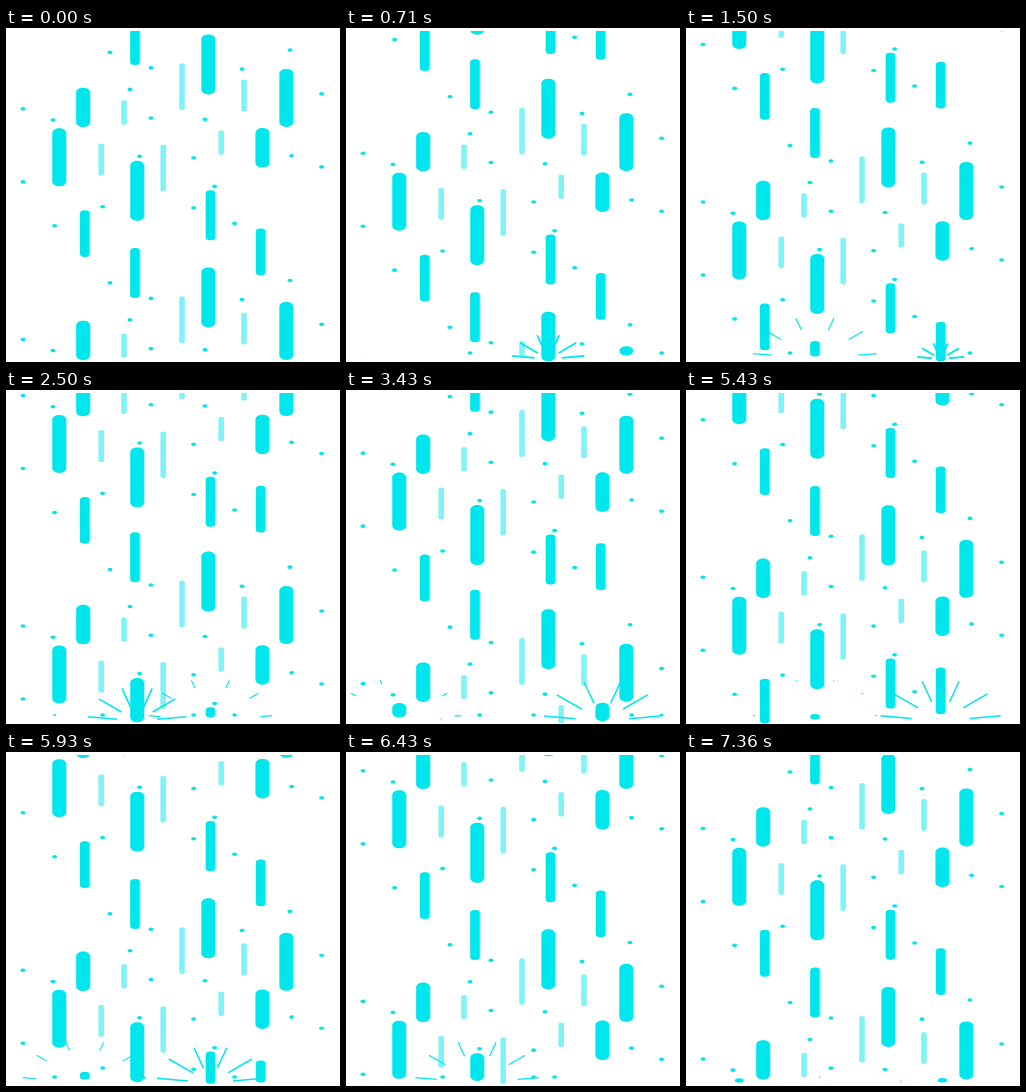
Animation, 334 px wide and 334 px high, one loop 7.43 s. Source, as an HTML page with a canvas:

```html
<!DOCTYPE html>
<html lang="en">
<head>
<meta charset="utf-8">
<title>Rain</title>
<style>
  html, body { margin: 0; width: 100%; height: 100%; overflow: hidden; background: #fff; }
  canvas { display: block; width: 334px; height: 334px; }
</style>
</head>
<body>
<canvas id="stage"></canvas>
<script>
const SIZE = 334, LOOP = 7430, STEPS = 104, FALL = 461, HALF = FALL / 2, GROUND = 331;
const CYAN = '#00e6ed', PALE = '#7ff3f6', EDGE = '#b4eaee';
const BAR_GAP = 228, SPLASH_START = 4, SPLASH_END = 46;

// The scene is half drawn: a half turn about the middle gives the other half.
const withTurned = (points, sumX, sumY) => points.flatMap(([x, y, h, gap = BAR_GAP]) => [
  { x, y, h, gap },
  { x: sumX - x, y: sumY - y, h, gap: HALF }
]);

// Bars: centre x, centre y, height, optional gap to the next copy
const wide = withTurned([[77, 79, 39.5], [202.2, 36, 60], [280.2, 69.5, 58]], 333.3, 198.4);
const narrow = withTurned([[128.9, 11.6, 50], [254.6, 223.6, 46.8, 260]], 333.3, 198.4);
const thin = withTurned([[176, 58.3, 46.7], [118, 84, 24.5], [238, 67, 32]], 333.2, 198);
const dots = withTurned([
  [17, 80.5], [17, 153.5], [47, 91.7], [104, 24], [124, 61],
  [145, 39.5], [145, 89.7], [199, 91], [236, 40.7], [284, 21.6]
], 332.6, 219);
const rayTips = [[5, 62], [30, 55.5], [65, 45]];   // degrees, length

const canvas = document.getElementById('stage');
const ctx = canvas.getContext('2d');
const ratio = window.devicePixelRatio || 1;
canvas.width = canvas.height = SIZE * ratio;
ctx.scale(ratio, ratio);

const clamp = (v, lo = 0, hi = 1) => Math.min(hi, Math.max(lo, v));
const copies = (y, gap) => [y - FALL, y - gap, y, y - gap + FALL];

function capsule(cx, top, w, h, color) {
  ctx.fillStyle = color;
  ctx.beginPath();
  ctx.roundRect(cx - w / 2, top, w, h, { x: w / 2, y: Math.min(h / 2, w * 0.34) });
  ctx.fill();
}

// A bar sinks into the ground, flattens and shrinks away.
function drawBar(x, top, w, h, color) {
  if (top > 330 || top + h < 0) return;
  const end = top + h, past = end - GROUND;
  const sunk = Math.min(end, clamp(334 - (past - 10) / 4, 327.5, 333.5));
  const bottom = Math.max(sunk, Math.min(top + 5.5, 330.5, end));
  const width = w * clamp((330 - top) / 6);
  if (color === CYAN) capsule(x + 1.2, top, width, bottom - top, EDGE);
  capsule(x, top, width, bottom - top, color);
}

function drawSplash(x, past) {
  if (past < SPLASH_START || past > SPLASH_END) return;
  const age = past - SPLASH_START;
  const outer = Math.sin(clamp(age / 22) * Math.PI / 2);
  const inner = Math.min(age / 40, outer);
  ctx.strokeStyle = CYAN;
  ctx.lineWidth = clamp(2.1 - past / 35, 1.1, 1.9);
  ctx.beginPath();
  for (const [angle, length] of rayTips) {
    const rad = angle * Math.PI / 180;
    const dx = Math.cos(rad) * length, dy = Math.sin(rad) * length;
    for (const side of [-1, 1]) {
      ctx.moveTo(x + side * dx * inner, GROUND - dy * inner);
      ctx.lineTo(x + side * dx * outer, GROUND - dy * outer);
    }
  }
  ctx.stroke();
}

// A dot rests on the ground for a moment before it fades.
function drawDot(x, y) {
  const rest = 325, scale = clamp((32 - (y - rest)) / 7);
  if (y < 0 || !scale) return;
  ctx.fillStyle = CYAN;
  ctx.beginPath();
  ctx.ellipse(x, Math.min(y, rest), 2.5 * scale, 1.8 * scale, 0, 0, Math.PI * 2);
  ctx.fill();
}

function drawBars(bars, w, color, fallen) {
  for (const { x, y, h, gap } of bars)
    for (const start of copies(y, gap)) drawBar(x, start + fallen - h / 2, w, h, color);
}

// Only splashes that fit whole into the loop are played.
function drawSplashes(bars, fallen) {
  for (const { x, y, h, gap } of bars)
    for (const start of copies(y, Math.min(gap, HALF))) {
      const past = start + h / 2 - GROUND;
      if (past < SPLASH_START && past + FALL > SPLASH_END) drawSplash(x, past + fallen);
    }
}

function draw(p) {
  const fallen = FALL * p + 0.4;
  ctx.fillStyle = '#fff';
  ctx.fillRect(0, 0, SIZE, SIZE);
  ctx.save();
  ctx.beginPath();
  ctx.rect(0, 3, SIZE, 330.5);
  ctx.clip();
  drawBars(thin, 5.6, PALE, fallen);
  for (const { x, y } of dots)
    for (const start of copies(y, HALF)) drawDot(x, start + fallen);
  drawBars(wide, 13.7, CYAN, fallen);
  drawBars(narrow, 9.5, CYAN, fallen);
  drawSplashes(wide, fallen);
  drawSplashes(narrow, fallen);
  ctx.restore();
}

// Steps begin on whole hundredths of a second
function stepAt(t) {
  const begin = i => Math.round(i * LOOP / STEPS / 10) * 10;
  const i = Math.floor(t * STEPS / LOOP);
  if (begin(i) > t) return i - 1;
  return begin(i + 1) <= t ? i + 1 : i;
}

function tick() {
  draw(stepAt(performance.now() % LOOP) / STEPS);
  requestAnimationFrame(tick);
}
tick();
</script>
</body>
</html>
```
